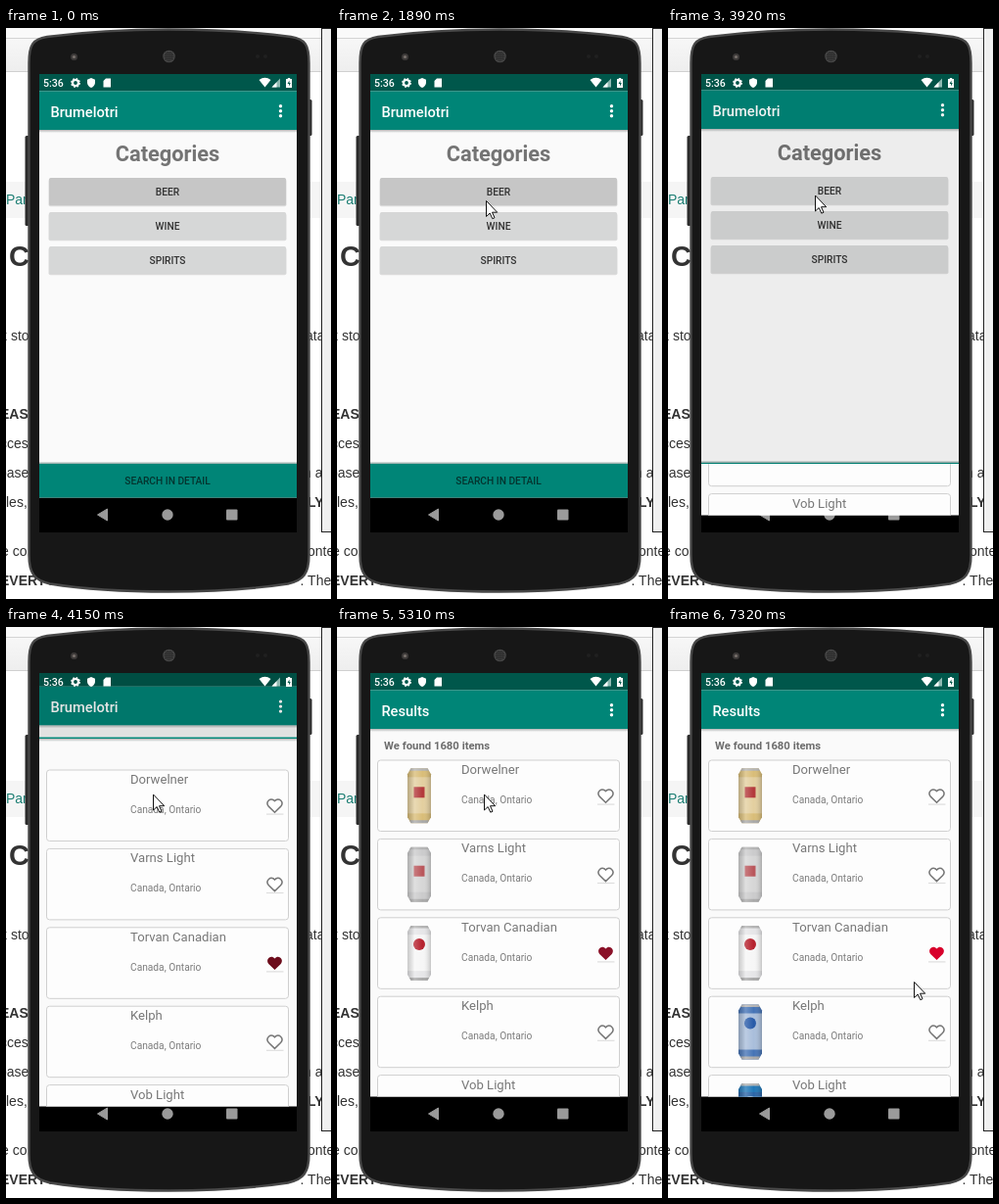
An HTML page for the animation above (8 s loop, 332x583 px).

```html
<!DOCTYPE html>
<html lang="en">
<head>
<meta charset="utf-8">
<title>Drinks app</title>
<style>
html, body { margin: 0; width: 100%; height: 100%; overflow: hidden; background: #fff; }
svg { display: block; width: 100%; height: 100%; }
text { font-family: Roboto, sans-serif; white-space: pre; }
.page text { font: 14px "Liberation Sans", Arial, sans-serif; fill: #333; }
.page .b { font-weight: 700; }
.title { font-size: 14.7px; font-weight: 500; fill: #fff; }
.btn { font-size: 10.2px; font-weight: 500; text-anchor: middle; fill: #333; }
.name { font-size: 13.1px; fill: #777; }
.place { font-size: 10.2px; fill: #7c7c7c; }
</style>
</head>
<body>
<svg id="stage" viewBox="0 0 332 583" xmlns="http://www.w3.org/2000/svg"></svg>
<script>
const LOOP = 8000;
const TEAL = '#008577', DARK = '#00574b';

const rect = (x, y, w, h, fill, more = '') =>
  `<rect x="${x}" y="${y}" width="${w}" height="${h}" fill="${fill}" ${more}/>`;
const circle = (x, y, r, fill, more = '') =>
  `<circle cx="${x}" cy="${y}" r="${r}" fill="${fill}" ${more}/>`;
const path = (d, fill, more = '') => `<path d="${d}" fill="${fill}" ${more}/>`;
const text = (x, y, str, cls = '', more = '') =>
  `<text x="${x}" y="${y}" class="${cls}" ${more}>${str}</text>`;

// Web page behind the phone
function page() {
  const lines = [
    [-6, 319, 'k sto'], [-6, 399, 'EAS', 'b'], [-6, 429, 'cces'], [-7, 459, 'base'],
    [0, 489, 'les,'], [-5, 539, 'e co'], [-6, 569, 'EVERY A', 'b'],
    [306, 319, 'ata'], [304, 459, 'n a'], [308, 489, 'LY', 'b'],
    [308, 539, 'onte'], [294, 569, "' . The"]
  ];
  return `<g class="page">` +
    rect(0, 0, 332, 583, '#fff') + rect(0, 0, 332, 10, '#fafafa') +
    rect(0, 10, 332, 1, '#d4d4d4') + rect(0, 11, 332, 33, 'url(#bar)') +
    rect(0, 44, 332, 1, '#d0d0d0') + rect(0, 157, 322, 37, '#f5f5f5') +
    text(0, 180, 'Par', '', 'style="fill:#1d7f74"') +
    text(3, 243, 'C', 'b', 'style="font-size:29px"') +
    lines.map(l => text(...l)).join('') +
    rect(322.5, .5, 20, 514, '#f0f0f0', 'stroke="#222"') + `</g>`;
}

function phone() {
  const shell = 'M23.5 36C23.5 17 27 11.5 42 9Q100 1.5 166 1.5Q235 1.5 291 9' +
    'C306 11.5 309.5 17 309.5 36V538C309.5 557 304 564 288 567.5' +
    'Q235 575.5 166 575.5Q95 575.5 45 567.5C29 564 23.5 557 23.5 538Z';
  return rect(19.5, 110, 5, 92, '#2b2b2b', 'rx="1.5"') +
    rect(307, 73, 5.5, 37, '#2b2b2b', 'rx="1.5"') +
    path(shell, '#171717', 'stroke="#474747" stroke-width="2.4"') +
    circle(69.5, 29.5, 3.5, '#3d3a39') + circle(69.5, 29.5, 1.6, '#77706c') +
    circle(166.5, 29, 6.3, '#464646') + circle(166.5, 29, 5, 'url(#mesh)') +
    circle(257, 29, 2, '#202020') + circle(265, 29, 2, '#202020') +
    rect(34, 47, 263, 468, '#000');
}

function navBar() {
  const grey = '#9a9a9a';
  return path('M93.5 497L103.5 491V503Z', grey, `stroke="${grey}" stroke-linejoin="round"`) +
    circle(165, 497, 5.7, grey) + rect(225, 491.5, 11.5, 11, grey, 'rx="1"');
}

function statusIcons() {
  const gear = circle(71, 56, 3, 'none', 'stroke="#fff" stroke-width="2.2"') +
    circle(71, 56, 4.3, 'none', 'stroke="#fff" stroke-width="1.3" stroke-dasharray="1.7 1.68"');
  return text(38, 59.7, '5:36', '', 'font-size="10.6" font-weight="500" fill="#fff"') + gear +
    path('M87 51L91 52.7V56Q90.5 59.5 87 61Q83.5 59.5 83 56V52.7Z', '#fff') +
    path('M102 51.5H107V60.5H99.5V54Z', '#fff') +
    path('M258.5 53Q264.5 48.5 270.5 53L264.5 60.5Z', '#fff') +
    path('M280 51.5V60.5H271.5Z', '#8fb9b2') + path('M276.5 55.2V60.5H271.5Z', '#fff') +
    path('M287.8 51H290.2V52H292V61H286V52H287.8Z', '#fff') +
    path('M289.5 53.5L287.5 57H289V59.5L290.8 56H289.5Z', DARK);
}

const appBar = title =>
  rect(34, 104, 263, 3, 'url(#shade)') + rect(34, 47, 263, 17.5, DARK) +
  rect(34, 64.5, 263, 39.5, TEAL) + text(45.4, 90.7, title, 'title') +
  [79.8, 84.8, 89.8].map(y => circle(280.5, y, 1.7, '#fff')).join('');

function button(y, label, id = '') {
  return rect(43.5, y + 1, 243, 28.3, '#000', 'rx="2" opacity=".13"') +
    rect(44, y, 242, 28, '#d6d7d7', `rx="1.5" ${id}`) +
    text(165, y + 17.7, label, 'btn');
}

function home() {
  return rect(34, 47, 263, 432.5, '#fafafa') + appBar('Brumelotri') +
    text(165, 136, 'Categories', '',
      'font-size="21.8" font-weight="700" fill="#747474" text-anchor="middle"') +
    button(153, 'BEER', 'id="beer"') + button(188, 'WINE') + button(223, 'SPIRITS') +
    rect(34, 443.5, 263, 1.5, '#9fb5b2') + rect(34, 445, 263, 34.5, TEAL) +
    text(165, 465.7, 'SEARCH IN DETAIL', 'btn', 'style="fill:#04342f"');
}

const HEART = 'M0 7L-6 1.2C-10.2 -3.4 -4 -9.2 0 -4.6C4 -9.2 10.2 -3.4 6 1.2Z';

// Body, band and badge colours for each can
const items = [
  { name: 'Dorwelner', body: '#d9bd78', band: '#e3cf9f', mark: '#b3383a', square: 1, at: 4850 },
  { name: 'Varns Light', body: '#cbcbcc', band: '#d6d6d6', mark: '#b9555a', square: 1, at: 5000 },
  { name: 'Torvan Canadian', body: '#e6e6e8', band: '#f6f6f6', mark: '#b5202c', at: 5310 },
  { name: 'Kelph', body: '#4674b6', band: '#a9bedb', mark: '#275aa8', at: 5610 },
  { name: 'Vob Light', body: '#2178b8', band: '#2b66a8', mark: '#e0e8f0', at: 5780 }
];

function can(c) {
  const badge = c.square ? rect(7, 19, 11, 11, c.mark) : circle(12.5, 19, 6, c.mark);
  const shape = 'M4 0H21L24.5 6V50L21 56H4L.5 50V6Z';
  return path(shape, c.body) + rect(.5, 9, 24, 37, c.band) + badge +
    path('M4 0H21L22.5 2.5H2.5Z', '#b4b4b4') +
    path('M2.5 53H22.5L21 56H4Z', '#a9a9a9') + path(shape, 'url(#round)');
}

function card(c, i) {
  const y = 136 + i * 80.4, liked = i === 2;
  return `<g transform="translate(0 ${y})">` +
    rect(41.5, 0, 247, 72.5, '#fdfdfd', 'rx="3" stroke="#cfcfcf"') +
    `<g id="can${i}" transform="translate(71.5 8.3)">${can(c)}</g>` +
    text(127, 14, c.name, 'name') + text(127, 43.8, 'Canada, Ontario', 'place') +
    rect(266, 44.5, 17.5, 1.2, '#dedede') +
    path(HEART, liked ? '#8a1128' : '#fff',
      `transform="translate(274.5 36.2)" stroke-width="1.5" ` +
      (liked ? 'id="liked"' : 'stroke="#777"')) + `</g>`;
}

function results() {
  return rect(34, 47, 263, 432.5, '#fafafa') + appBar('Results') +
    text(48, 124.7, 'We found 1680 items', '',
      'id="found" font-size="11.3" font-weight="700" fill="#6c6c6c"') +
    `<g clip-path="url(#list)">${items.map(card).join('')}</g>`;
}

const stop = (at, color, alpha = 1) =>
  `<stop offset="${at}" stop-color="${color}" stop-opacity="${alpha}"/>`;

document.getElementById('stage').innerHTML = `<defs>
  <linearGradient id="bar" x2="0" y2="1">${stop(0, '#f7f7f7')}${stop(1, '#eeeeee')}</linearGradient>
  <linearGradient id="shade" x2="0" y2="1">${stop(0, '#000', .28)}${stop(1, '#000', 0)}</linearGradient>
  <linearGradient id="round">${stop(0, '#000', .18)}${stop(.3, '#fff', .22)}${stop(.65, '#fff', 0)}${stop(1, '#000', .2)}</linearGradient>
  <pattern id="mesh" width="2" height="2" patternUnits="userSpaceOnUse">${rect(0, 0, 2, 2, '#2b2b2b')}${rect(0, 0, 1, 1, '#4c4c4c')}</pattern>
  <clipPath id="screen">${rect(34, 47, 263, 468, '#000')}</clipPath>
  <clipPath id="list">${rect(34, 107, 263, 372.5, '#000')}</clipPath>
  <clipPath id="reveal"><rect id="edge" x="34" width="263" height="468"/></clipPath>
</defs>` + page() + phone() + `<g clip-path="url(#screen)">` + navBar() +
  `<g id="old">${home()}${rect(34, 47, 263, 432.5, '#000', 'id="dim"')}</g>` +
  `<g id="next" clip-path="url(#reveal)"><g id="slide">${results()}</g></g>` +
  statusIcons() + `</g>` +
  path('M.5 .5V16.5L4.2 13L6.8 18.7L9 17.7L6.5 12.2H11.7Z', '#fff',
    'id="cursor" stroke="#111" stroke-width="1"');

const $ = Object.fromEntries([...document.querySelectorAll('[id]')].map(e => [e.id, e]));
const set = (id, name, value) => $[id].setAttribute(name, value);
const show = (id, on) => set(id, 'visibility', on ? 'inherit' : 'hidden');

// Time, x, y of the pointer; each place holds until the next
const pointer = [
  [880, 265, 554], [960, 251, 514], [1280, 214, 360], [1350, 177, 210],
  [1580, 168, 197], [1660, 158, 185], [1740, 152, 178],
  [1890, 152, 176], [1970, 147, 170], [2040, 141, 163], [2120, 138, 159], [2290, 150, 170.5],
  [5690, 175, 215], [5770, 212, 278], [5850, 248, 328], [5930, 263, 346],
  [6260, 265, 343], [6340, 268, 338], [6410, 271, 335], [6490, 273, 332], [6640, 277, 326],
  [6720, 283, 317], [6790, 286, 313], [6860, 280, 320], [6940, 270, 332], [7020, 261, 341],
  [7090, 259, 346], [7170, 256, 352], [7240, 253, 358], [7320, 251, 362]
];

// Time, slide offset, reveal edge, lift and dimming of the old screen
const opening = [
  [0, 19, 515, 0, 0], [3920, 18, 445, -1, .05], [3990, 17, 396, -1.5, .07],
  [4150, 10, 112.5, -3.7, .1], [4220, 3, 62, -6, .1], [4300, 0, 47, -8, .1]
];

const held = (keys, t) => keys.filter(k => k[0] <= t).pop();

function draw(t) {
  const p = held(pointer, t);
  show('cursor', p);
  if (p) set('cursor', 'transform', `translate(${p[1]} ${p[2]})`);

  const [, slide, edge, lift, dim] = held(opening, t);
  show('next', t >= 3920);
  set('slide', 'transform', `translate(0 ${slide})`);
  set('edge', 'y', edge);
  set('old', 'transform', `translate(0 ${lift})`);
  set('dim', 'opacity', dim);

  set('beer', 'fill', t < 2820 ? '#c6c6c6' : t < 3920 ? '#cecece' : '#d6d7d7');
  set('liked', 'fill', t < 4300 ? '#6d0d1c' : t < 6490 ? '#8a1128' : '#d8002b');
  show('found', t >= 4450);
  items.forEach((c, i) => show('can' + i, t >= c.at));
}

const start = performance.now();
function tick() {
  draw((performance.now() - start) % LOOP);
  requestAnimationFrame(tick);
}
tick();
</script>
</body>
</html>
```
